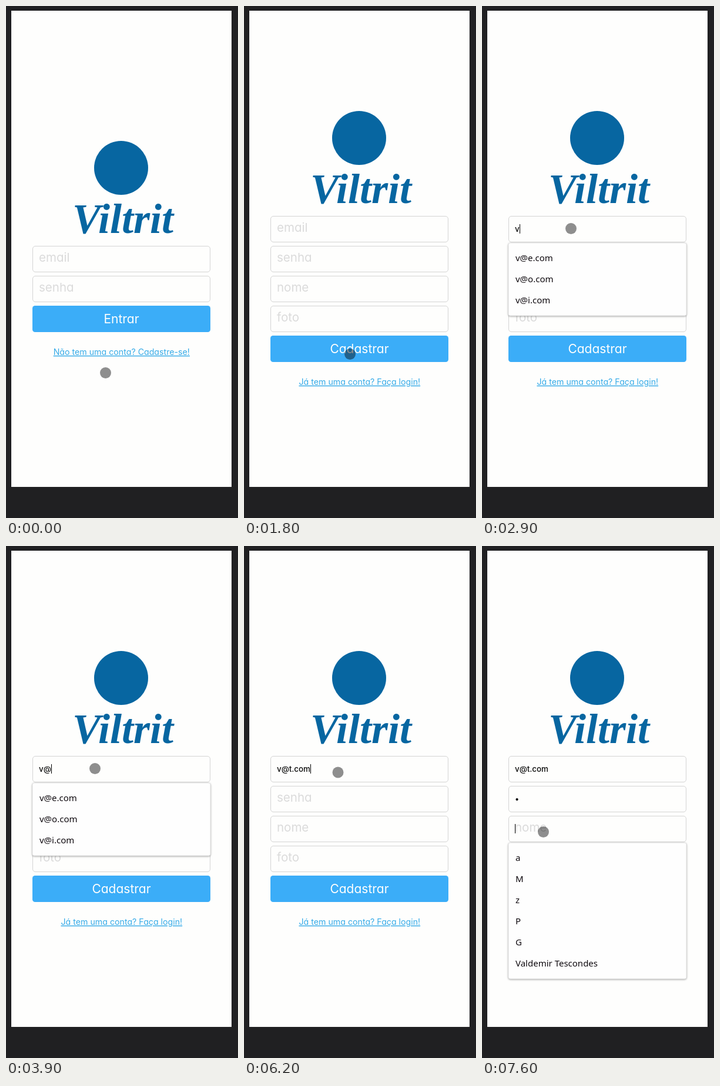
An HTML page that plays this animation: 395 by 873 pixels, repeating every 8 s.

```html
<!DOCTYPE html>
<html lang="pt-BR">
<head>
<meta charset="utf-8">
<title>Login e cadastro</title>
<style>
  html, body { margin: 0; width: 100%; height: 100%; overflow: hidden; background: #202022; }
  svg { display: block; width: 395px; height: 873px; }
  text { font-family: Inter, "Open Sans", sans-serif; font-feature-settings: "cv11"; }
  .brand { font: italic bold 72px "Liberation Serif", serif; fill: #0766a1; text-anchor: middle; }
  .box { fill: #fefefd; stroke: #d4d4d4; }
  .hint { font-size: 20.5px; fill: #dbdbdb; }
  .value { font-size: 13.33px; font-weight: 500; fill: #0b0b0b; }
  .button { fill: #3badf8; }
  .label { font-size: 21px; fill: #fefefd; text-anchor: middle; }
  .link { font-size: 14.2px; fill: #36abe8; text-anchor: middle; text-decoration: underline; }
  .list rect { fill: #fefefe; stroke: #e2e2e2; filter: drop-shadow(0 1px 1.5px rgba(0, 0, 0, .35)); }
  .list text { font: 500 15px "Noto Sans", sans-serif; fill: #100b10; }
</style>
</head>
<body>
<svg id="stage" viewBox="0 0 395 873"></svg>
<script>
const LOOP = 8000, FIELD_X = 56;

// Times in ms; every value holds until the next entry.
const pointer = [
  [0, 169.5, 625.5], [1000, 171, 612], [1100, 176.5, 599], [1200, 172.5, 596.5],
  [1400, 183.5, 600.5], [1500, 180.5, 593.5],
  [2000, 186, 562], [2100, 197, 505], [2200, 191, 433], [2300, 173, 372], [2400, 158, 359], [2500, 151.5, 379.5],
  [6200, 160, 386], [6300, 165.5, 405], [6400, 143.5, 425.5], [6600, 140, 429.5], [6700, 137.5, 428.5],
  [7100, 132, 455], [7200, 115, 478], [7300, 104.5, 487.5]
];
const page = [[0, "login"], [1800, "signup"]];
const focus = [[0, ""], [2800, "email"], [6800, "senha"], [7500, "nome"]];
const list = [[0, ""], [2800, "all"], [2900, "match"], [4400, ""], [7600, "names"]];
const values = {
  email: [[0, ""], [2900, "v"], [3800, "v@"], [4400, "v@t"], [5100, "v@t."],
          [5400, "v@t.c"], [5500, "v@t.co"], [5700, "v@t.com"]],
  senha: [[0, ""], [7000, "•"]]
};
const mails = ["v@e.com", "v@o.com", "v@i.com"];
const names = ["a", "M", "z", "P", "G", "Valdemir Tescondes"];

const at = (track, t) => track.findLast(step => step[0] <= t);
const write = (cls, x, y, str) => `<text class="${cls}" x="${x}" y="${y}">${str}</text>`;

function field(name, y, key) {
  return `<rect class="box" x="45.5" y="${y + .5}" width="302" height="44" rx="4.5"/>
    ${write("hint", FIELD_X, y + 27, name)}
    ${key ? `<text class="value" id="${key}" x="${FIELD_X}" y="${y + 27}"></text>` : ""}`;
}

function form(id, top, fields, action, link) {
  const end = top + 179 + fields.length * 51;
  return `<g id="${id}">
    <circle cx="196" cy="${top + 46}" r="46" fill="#0766a1"/>
    ${write("brand", 199, top + 157, "Viltrit")}
    ${fields.map((name, i) => field(name, top + 179 + i * 51, id === "signup" && name)).join("")}
    <rect class="button" x="45" y="${end}" width="303" height="45" rx="4.5"/>
    ${write("label", 196.5, end + 30, action)}
    ${write("link", 196.8, end + 84, link)}
  </g>`;
}

function popup(id, y, rows, height = rows.length * 36 + 16) {
  return `<g class="list" id="${id}">
    <rect x="45" y="${y}" width="303" height="${height}" rx="3"/>
    ${rows.map((row, i) => write("", 57, y + 31 + i * 36, row)).join("")}
  </g>`;
}

const $ = id => document.getElementById(id);
$("stage").innerHTML = `
  <rect x="9" y="8" width="375" height="812" fill="#fefefd"/>
  ${form("login", 230, ["email", "senha"], "Entrar", "Não tem uma conta? Cadastre-se!")}
  ${form("signup", 179, ["email", "senha", "nome", "foto"], "Cadastrar", "Já tem uma conta? Faça login!")}
  ${popup("all", 404, mails, 241)}
  ${popup("match", 404, mails)}
  ${popup("names", 506, names)}
  <rect id="caret" width="1" height="16" fill="#000"/>
  <circle id="pointer" r="9.5"/>`;

function show(ids, current) {
  for (const id of ids) $(id).style.display = id === current ? "" : "none";
}

function draw() {
  const t = performance.now() % LOOP;
  show(["login", "signup"], at(page, t)[1]);
  show(["all", "match", "names"], at(list, t)[1]);

  for (const [key, track] of Object.entries(values)) {
    const value = at(track, t)[1], node = $(key);
    if (node.textContent !== value) node.textContent = value;
    node.previousElementSibling.style.display = value ? "none" : "";
  }

  const active = at(focus, t)[1], caret = $("caret");
  caret.style.display = active ? "" : "none";
  if (active) {
    const node = $(active);
    const width = node.textContent ? node.getComputedTextLength() : 0;
    caret.setAttribute("x", Math.round(FIELD_X + width));
    caret.setAttribute("y", node.getAttribute("y") - 13);
  }

  const [, x, y] = at(pointer, t);
  const pressed = t >= 1700 && t < 1800;
  $("pointer").setAttribute("transform", `translate(${x} ${y})`);
  $("pointer").setAttribute("fill", `rgba(0, 0, 0, ${pressed ? .5 : .44})`);
  requestAnimationFrame(draw);
}
draw();
</script>
</body>
</html>
```
